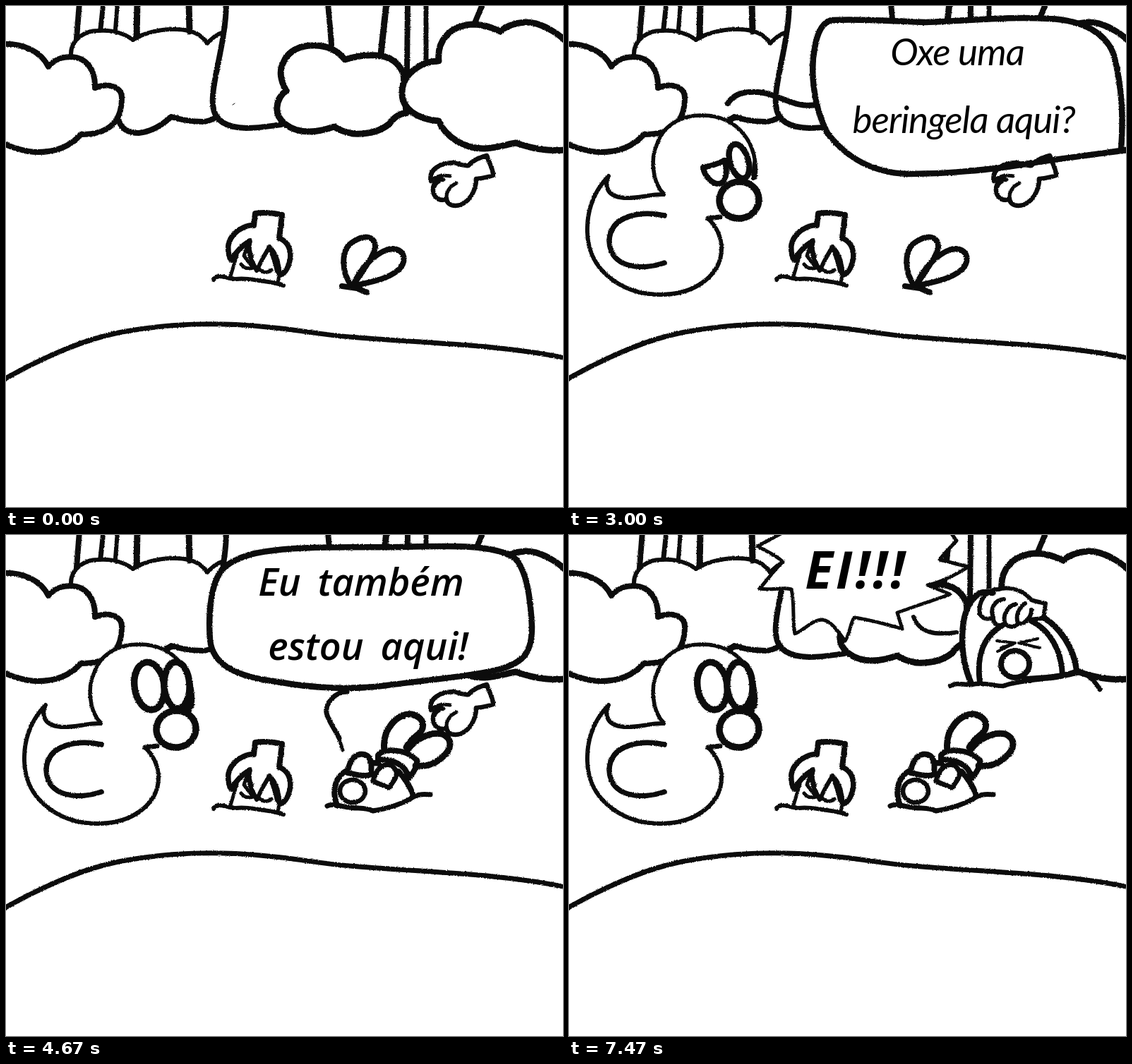
An HTML page for the animation above (8 s loop, 789 by 710 pixels).

```html
<!DOCTYPE html>
<html lang="pt">
<head>
<meta charset="utf-8">
<style>
html, body { margin: 0; width: 100%; height: 100%; overflow: hidden; background: #fff; }
svg { display: block; width: 789px; height: 710px; }
path, ellipse { stroke: #0c0c0c; stroke-linecap: round; stroke-linejoin: round; fill: none; }
.fill { fill: #fff; }
text { font-family: "Open Sans", "Noto Sans", sans-serif; font-style: italic; fill: #000; text-anchor: middle; }
.thin { font-family: Lato, "Open Sans", sans-serif; font-size: 53px; letter-spacing: -1px; }
.bold { font-size: 54px; font-weight: 600; word-spacing: 10px; }
.shout { font-size: 73px; font-weight: 700; letter-spacing: 4px; }
</style>
</head>
<body>
<svg id="stage" viewBox="0 0 789 710">
  <defs>
    <filter id="chalk" filterUnits="userSpaceOnUse" x="0" y="0" width="789" height="710" color-interpolation-filters="sRGB">
      <feTurbulence type="fractalNoise" baseFrequency="0.55" numOctaves="2" seed="4" result="n"/>
      <feDisplacementMap in="SourceGraphic" in2="n" scale="2.6" xChannelSelector="R" yChannelSelector="G"/>
    </filter>
  </defs>
  <g id="art" filter="url(#chalk)"></g>
  <g id="words"></g>
</svg>
<script>
const LOOP = 8000, CUTS = [0, 1000, 2000, 3670, 4670, 6670];
const art = document.getElementById("art"), words = document.getElementById("words");
const parts = [];

function make(parent, tag, attrs) {
  const el = document.createElementNS("http://www.w3.org/2000/svg", tag);
  for (const k in attrs) el.setAttribute(k, attrs[k]);
  parent.appendChild(el);
  return el;
}
// A group that is visible during the listed scenes.
function part(scenes, parent = art) {
  const el = make(parent, "g", {});
  parts.push({ el, scenes });
  return el;
}
const line = (g, w, d) => make(g, "path", { d, "stroke-width": w });
const shape = (g, w, d) => make(g, "path", { d, "stroke-width": w, class: "fill" });
const blank = (g, d) => make(g, "path", { d, class: "fill", style: "stroke:none" });
const oval = (g, w, cx, cy, rx, ry, turn = 0) => make(g, "ellipse", {
  cx, cy, rx, ry, "stroke-width": w, class: "fill", transform: `rotate(${turn} ${cx} ${cy})`
});
function say(scene, cls, rows) {
  const g = part([scene], words);
  for (const [x, y, s] of rows) make(g, "text", { x, y, class: cls }).textContent = s;
}
const ALL = [0, 1, 2, 3, 4, 5];

// Forest
const wood = part(ALL);
line(wood, 8, "M104 -5L100 46");
line(wood, 7, "M138 -5L134 32");
line(wood, 6, "M158 -5L155 33");
line(wood, 9, "M186 -5L185 44M259 -5L260 36");
line(wood, 8, "M456 -5C458 20 460 40 461 55");
line(wood, 9, "M539 -5L531 68");
line(wood, 8, "M569 -5L568 92");
line(wood, 7, "M595 -5L595 76");
line(wood, 8, "M676 -5L664 24");
line(wood, 6, "M92 68C92 45 115 35 130 35C155 33 172 42 180 48C195 38 220 32 240 33C265 33 278 42 285 53C292 46 298 40 306 38");
line(wood, 8, "M160 163C165 178 178 180 188 180C208 178 222 168 234 157C250 162 265 164 280 164C288 163 293 161 298 157");
line(wood, 8, "M312 -5C312 50 290 110 293 140C295 165 315 172 340 173C360 173 375 170 390 168");
line(wood, 1, "M321 140L324 138");
shape(wood, 8, "M-8 54C25 52 50 65 60 86C72 72 86 72 93 72C112 73 127 88 126 116C146 108 164 115 164 130C164 160 150 182 106 182C90 200 70 207 46 207C25 207 8 200 -8 193");
shape(wood, 9, "M397 120C388 105 387 90 393 80C400 62 420 55 437 56C460 56 472 66 480 76C500 70 515 69 525 70C545 71 558 82 563 97L567 152C555 152 548 160 543 167C530 178 512 182 492 181C482 179 470 175 465 171C450 176 440 178 430 178C400 178 382 160 384 143C385 132 390 125 397 120Z");
shape(wood, 9, "M800 58C785 38 755 22 735 23C720 24 708 29 700 36C688 30 675 26 660 26C630 28 610 48 613 78C590 78 560 95 561 125C562 145 580 160 613 163C622 185 650 203 678 202C695 201 710 196 722 194C740 200 765 208 800 203");
line(wood, 7, "M-8 532C50 499 110 471 170 461C230 450 300 448 360 454C420 459 450 467 500 470C580 476 640 479 690 484C740 489 770 494 798 500");

// Buried figure in the middle
const mid = part(ALL);
line(mid, 8, "M351 311L353 294C366 292 378 293 391 296L387 329");
line(mid, 7.5, "M351 310C330 312 312 328 315 348C316 355 317 359 319 360C326 348 334 340 345 333C343 342 344 349 347 354M387 329C400 334 405 347 402 361C399 374 393 381 387 381C386 366 382 350 373 342");
line(mid, 6, "M373 342C366 352 360 365 355 375L346 356M373 342C378 354 382 366 384 376");
line(mid, 5, "M327 353L318 383M333 366C338 373 346 373 352 370M357 370C362 379 370 379 376 374M343 336L337 354L350 371M387 381L385 392");
line(mid, 6, "M294 388C300 378 310 386 325 387C340 385 350 388 365 390C378 392 386 393 393 396");

// Duck
const duck = part([1, 2, 3, 4, 5]);
blank(duck, "M134 266C118 250 115 215 125 195C135 165 165 154 190 155C240 156 268 195 265 240L240 290L197 301Z");
line(duck, 6, "M197 301C208 312 216 325 216 344C216 380 180 409 130 409C75 409 27 375 26 320C25 285 38 260 56 241C50 254 52 272 83 272C103 272 118 266 134 267");
line(duck, 5.5, "M134 266C118 250 115 215 125 195C135 165 165 154 190 155C240 156 268 195 264 243");
line(duck, 7.5, "M228 160L238 158");
line(duck, 7.5, "M135 297C106 290 58 295 57 333C58 372 103 375 135 364");

const calm = part([1]);
line(calm, 7, "M197 301C212 299 228 296 240 290");
oval(calm, 7, 223, 209, 9, 24, 18);
oval(calm, 8, 246, 214, 8, 21, 12);
oval(calm, 9, 242, 266, 27, 24);
line(calm, 1, "M251 266L252 265");

const puzzled = part([2]);
line(puzzled, 8, "M190 229C200 227 212 223 220 219C226 235 222 251 212 252C202 252 192 241 190 229Z");
oval(puzzled, 8.5, 241, 220, 13, 25, -17);
line(puzzled, 6, "M263 222L261 244");

const amazed = part([3, 4, 5]);
oval(amazed, 9.5, 203, 214, 21, 34, -8);
oval(amazed, 9.5, 242, 213, 18, 33, -3);
line(amazed, 8, "M261 226C262 235 261 242 259 249M256 234L257 246");

const nose = part([2, 3, 4, 5]);
line(nose, 7, "M197 301L214 299");
oval(nose, 9.5, 241, 275, 28, 26, -10);

// Wings, then the figure they belong to
const wings = part([0, 1, 2]);
line(wings, 8, "M490 397C476 380 472 345 492 334C510 322 524 328 523 342C521 355 505 375 491 397C505 365 530 345 548 344C566 346 568 362 556 374C538 389 510 392 491 397");
line(wings, 8, "M476 397L497 400L511 406");

const bug = part([3, 4, 5]);
line(bug, 9, "M536 305C532 275 555 252 575 254C595 260 594 275 582 284C575 290 570 295 567 301M569 304C580 290 600 278 618 282C635 290 630 305 618 315C605 327 592 328 580 327");
line(bug, 8, "M527 320L527 312C535 302 565 302 582 319C583 328 577 337 571 344M527 318C548 318 567 326 569 342");
line(bug, 8, "M469 383C460 360 468 341 484 333M484 337C486 315 500 306 512 313C520 320 517 333 517 340C505 343 495 339 484 337M516 322L528 324M556 335C565 345 572 355 577 369");
line(bug, 7, "M520 349C525 325 545 318 553 335C555 344 547 350 543 358C535 356 528 352 520 349");
oval(bug, 6.5, 491, 363, 18, 16);
line(bug, 7, "M455 384C460 381 470 383 485 386C500 388 510 386 520 391C540 388 565 380 577 371C585 367 592 367 601 368");

// Speech bubbles
const ask = part([2]);
shape(ask, 8.5, "M373 20C420 18 460 22 505 23C560 22 620 14 680 18C730 20 762 40 772 70C782 110 786 150 782 205C740 211 690 217 640 225C600 232 530 238 480 238C420 236 385 205 366 180C345 140 342 90 348 60C352 35 360 22 373 20Z");
line(ask, 8, "M782 205L800 203M225 138C235 122 255 120 275 123C300 127 320 145 350 140");

const reply = part([4]);
shape(reply, 8.5, "M378 22C340 26 318 37 306 49C291 68 286 108 289 148C292 184 326 201 385 208C432 217 490 220 540 213C600 205 660 200 700 190C735 180 745 165 745 130C743 90 738 50 720 32C690 14 640 15 560 17C500 18 430 15 378 22Z");
line(reply, 7, "M483 222C465 222 452 240 454 252C456 263 466 275 472 288");
line(reply, 5, "M471 286L477 305");

const burst = part([5]);
shape(burst, 5, "M302 -3L267 16C282 24 294 29 303 38C290 50 280 65 270 76C288 79 302 73 315 77C320 98 316 120 320 140C332 136 344 120 359 120C372 122 382 138 391 150C398 140 398 126 404 117C428 120 450 127 472 133L465 110L540 84L508 71C530 66 550 55 566 45C552 42 538 38 525 35C533 24 541 17 549 8L541 -3");
line(burst, 6, "M488 116C497 140 520 142 549 138");

// Raised hand, then its owner
const hand = part([0, 1, 2, 3, 4]);
line(hand, 6.5, "M602 248C598 232 615 222 635 222C642 224 648 227 655 226C662 218 672 214 681 212C684 222 690 230 690 240C682 243 675 244 666 245C666 262 655 282 637 283C628 283 624 278 624 273C616 278 606 272 605 262C604 253 610 246 616 243");
line(hand, 5, "M602 248C608 241 618 239 629 241M624 274C623 264 628 256 638 251M605 260C608 252 612 248 620 246");

const head = part([5]);
blank(head, "M568 212C552 170 552 110 575 88C590 70 635 68 655 92L672 116C695 130 715 160 719 192C680 205 640 204 615 214Z");
line(head, 8.5, "M570 211C552 170 552 110 575 88C582 80 590 80 600 82M672 117C695 130 715 160 719 191");
line(head, 8, "M582 209C578 180 582 146 614 128M655 122C682 135 698 165 699 199");
line(head, 6, "M582 112C579 95 590 78 608 77C626 72 644 79 655 92C662 95 668 95 675 97L672 118L652 120");
line(head, 6, "M582 112C586 119 595 121 601 116C596 106 602 92 616 91M601 116C600 127 610 131 618 126C613 114 622 100 633 98M618 126C624 132 633 131 636 125C632 114 637 104 646 97M636 125C644 128 655 118 655 106");
line(head, 4, "M606 150L632 153L607 165M612 160L632 153M664 147L637 153L667 160");
oval(head, 8, 632, 183, 20, 19);
line(head, 6.5, "M540 214C550 208 560 213 570 212C590 208 600 214 615 214C640 204 680 207 718 193C735 195 745 207 752 219");
line(head, 8, "M645 204C670 203 695 201 722 194");

say(2, "thin", [[550, 84, "Oxe uma"], [559, 180, "beringela aqui?"]]);
say(4, "bold", [[503, 86, "Eu também"], [513, 177, "estou aqui!"]]);
say(5, "shout", [[407, 76, "EI!!!"]]);

let shown = -1;
function draw(now) {
  const t = now % LOOP;
  const scene = CUTS.filter(c => c <= t).length - 1;
  if (scene !== shown) {
    shown = scene;
    for (const p of parts) p.el.style.display = p.scenes.includes(scene) ? "" : "none";
  }
}
const start = performance.now();
function tick() {
  draw(performance.now() - start);
  requestAnimationFrame(tick);
}
tick();
</script>
</body>
</html>
```
